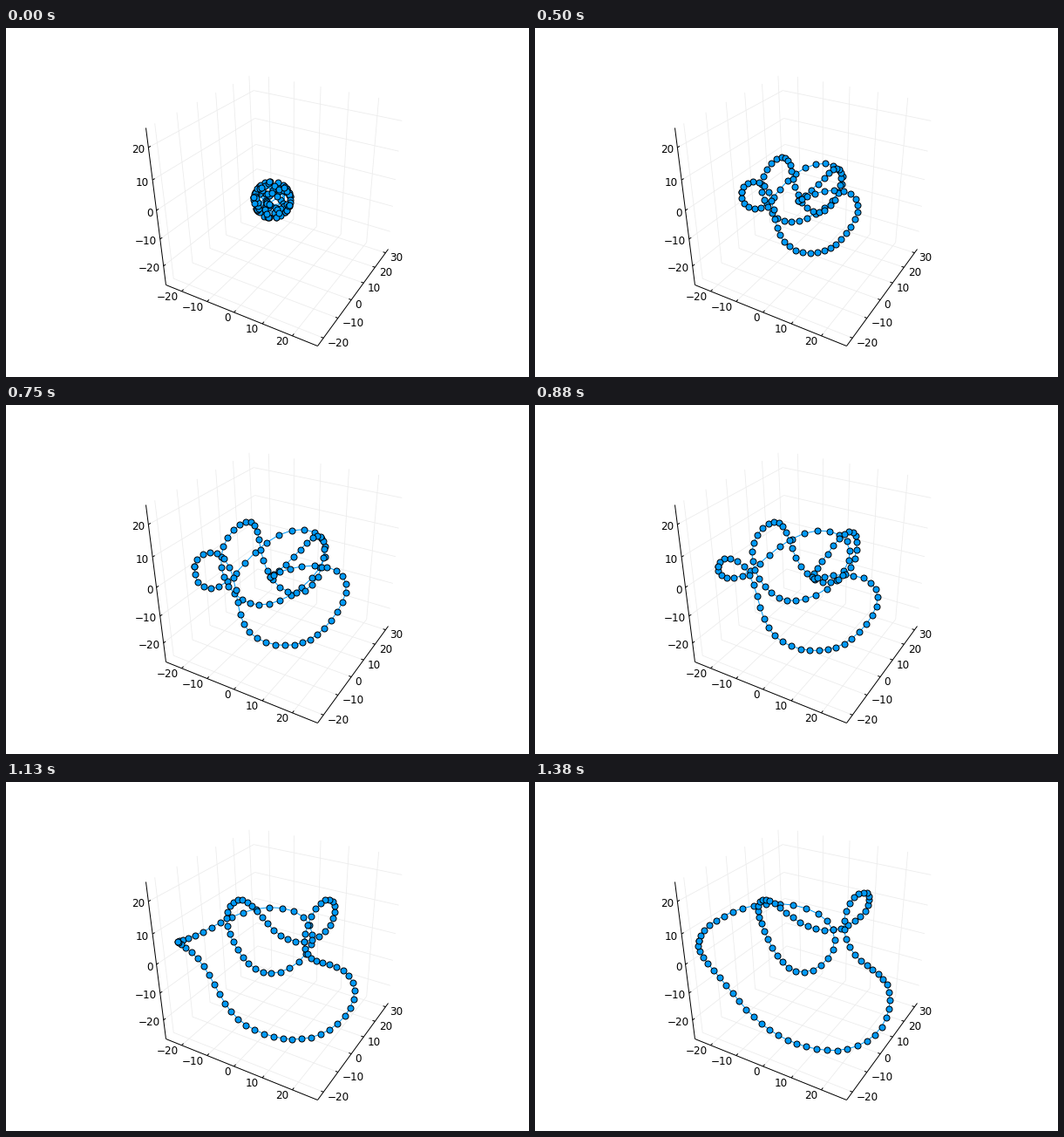
Recreate the animation shown at these times as a matplotlib script. Size 600 px wide and 400 px high, loop 1510 ms.

```python
import numpy as np
import matplotlib.pyplot as plt
from matplotlib.animation import FuncAnimation

W, H, DPI = 600, 400, 100
PX = 72 / DPI
BEADS, LAST_STEP, UNKNOT_STEP = 100, 11, 6
STEP_MS, TICK_MS, LOOP_MS = 125, 10, 1510
BLUE = "#009AF9"
CENTRE = np.array([304.5, 196])
rng = np.random.default_rng(7)


def ring(points):
    """Smooth closed chain: Fourier interpolation of a few key points."""
    modes = np.fft.rfft(np.array(points, float), axis=0)
    modes[-1] /= 2
    return np.fft.irfft(modes, BEADS, axis=0) * BEADS / len(points)


# Every fifth bead, while the loops still cross and when fully relaxed
crossed = ring([
    (209, 184), (237, 195), (294, 153), (357, 156), (334, 210),
    (279, 220), (249, 178), (267, 136), (291, 154), (320, 199),
    (362, 185), (364, 145), (335, 170), (319, 198), (365, 195),
    (391, 230), (354, 273), (304, 279), (262, 244), (239, 185)])
relaxed = ring([
    (187, 181), (216, 153), (280, 139), (341, 169), (318, 215),
    (277, 198), (257, 154), (264, 134), (295, 155), (341, 169),
    (378, 147), (376, 126), (354, 158), (373, 204), (403, 232),
    (397, 280), (346, 307), (289, 295), (242, 260), (204, 215)])

WAVES = np.arange(BEADS // 2 + 1)[:, None]
KINKS = np.fft.rfft(rng.normal(0, 11, (BEADS, 2)), axis=0) * (WAVES > 4)


def chain_at(step):
    """Bead positions: a kinked ball that swells, smooths and untangles."""
    late = max(step, UNKNOT_STEP)
    early = min(step / UNKNOT_STEP, 1)
    tangle = ((LAST_STEP - late) / 4) ** 1.2
    offset = relaxed + (crossed - relaxed) * tangle - CENTRE
    offset *= 0.3 + 0.7 * early
    # Short waves die out first
    decay = (1 - early) * np.exp(-step * (WAVES / 20) ** 2)
    offset += np.fft.irfft(KINKS * decay, BEADS, axis=0)
    radius = np.hypot(*offset.T)[:, None]
    return CENTRE + offset * np.minimum(1, (21 + 12 * step) / radius)


fig = plt.figure(figsize=(W / DPI, H / DPI), dpi=DPI, facecolor="white")
ax = fig.add_axes([0, 0, 1, 1])
ax.set_xlim(-0.5, W - 0.5)
ax.set_ylim(H - 0.5, -0.5)
ax.axis("off")

# Box corners on screen
LEFT, FRONT, RIGHT, BACK = np.array([(183, 294), (357, 364), (438, 253), (289, 206)], float)
LEFT_TOP, RIGHT_TOP, BACK_TOP = np.array([(160, 114), (456, 85), (283, 52)], float)


def mix(a, b, t):
    return a + (b - a) * t


def segment(a, b, color, width):
    ax.plot(*zip(a, b), color=color, lw=width * PX, solid_capstyle="butt")


def draw_axis(values, span, depth, edge, inner, wall, label_shift, align):
    """Grid lines, tick marks and labels along one edge in perspective."""
    low, high = span
    for value in values:
        u = (value - low) / (high - low)
        t = u / (u + depth * (1 - u))
        start, mid, end = (mix(*e, t) for e in (edge, inner, wall))
        segment(start, mid, "#ececec", 0.8)
        segment(mid, end, "#ececec", 0.8)
        inward = (mid - start) / np.hypot(*(mid - start))
        segment(start, start + 3 * inward, "black", 1)
        x, y = start + label_shift
        ax.text(x, y, str(value).replace("-", "\u2212"), ha=align,
                va="center_baseline", fontsize=12 * PX, family="DejaVu Sans")


draw_axis(range(-20, 21, 10), (-26.4, 28), 1.16, (LEFT, FRONT), (BACK, RIGHT),
          (BACK_TOP, RIGHT_TOP), (-4, 5.5), "right")
draw_axis(range(-20, 31, 10), (-23.8, 32.6), 0.8, (FRONT, RIGHT), (LEFT, BACK),
          (LEFT_TOP, BACK_TOP), (4.5, 4.5), "left")
draw_axis(range(-20, 21, 10), (-27.4, 25.7), 1.18, (LEFT, LEFT_TOP), (BACK, BACK_TOP),
          (RIGHT, RIGHT_TOP), (-4, 1.5), "right")
for a, b in ((LEFT_TOP, LEFT), (LEFT, FRONT), (FRONT, RIGHT)):
    segment(a, b, "black", 1)

chain, = ax.plot([], [], color=BLUE, lw=PX, marker="o", ms=7 * PX,
                 mfc=BLUE, mec="black", mew=PX, zorder=5)


def update(tick):
    beads = chain_at(min(tick * TICK_MS // STEP_MS, LAST_STEP))
    chain.set_data(*np.vstack((beads, beads[:1])).T)
    return chain,


anim = FuncAnimation(fig, update, frames=LOOP_MS // TICK_MS, interval=TICK_MS,
                     repeat=True, repeat_delay=0, blit=False)
plt.show()
```
